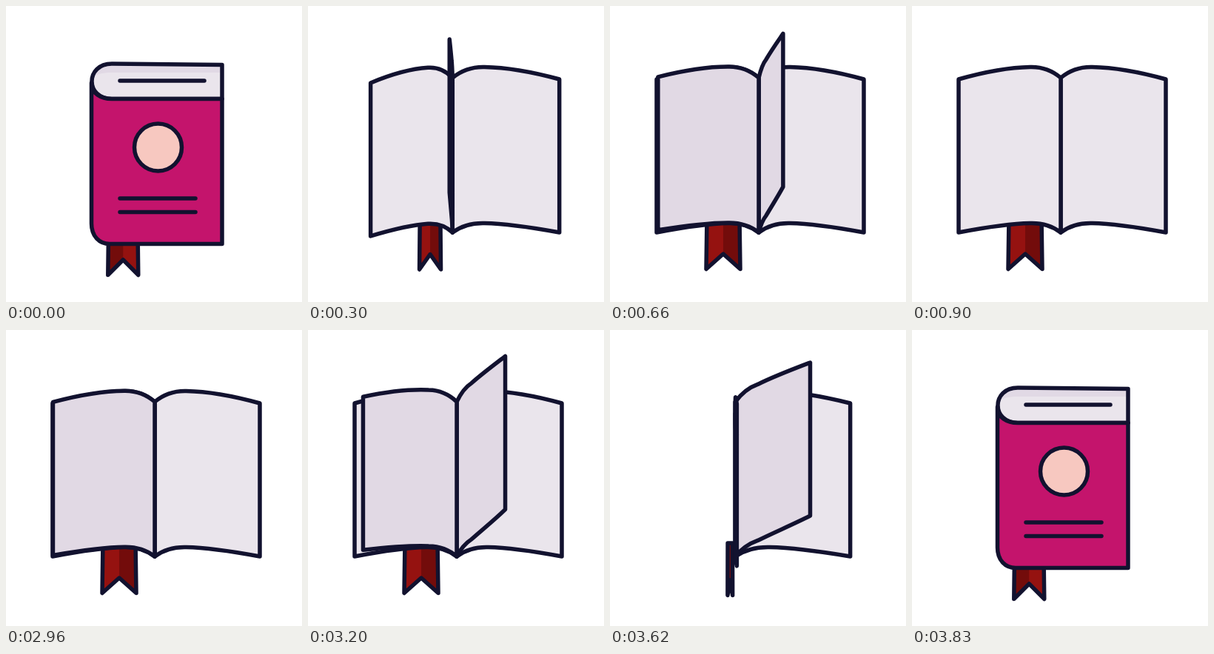
Recreate the animation shown at these times as an HTML page with a canvas. Size 400 px wide and 400 px high, loop 4.86 s.

```html
<!DOCTYPE html>
<html lang="en">
<head>
<meta charset="utf-8">
<title>Opening book</title>
<style>
  html, body { margin: 0; width: 100%; height: 100%; overflow: hidden; background: #fff; }
  canvas { display: block; width: 100vmin; height: 100vmin; }
</style>
</head>
<body>
<canvas id="stage" width="400" height="400"></canvas>
<script>
const ctx = document.getElementById('stage').getContext('2d');
const LOOP = 4860, STEP = 30, OPENED = 900, CLOSING = 2960;
const INK = '#12122f', PAPER = '#eae5ec', TURNING = '#e1d9e4';
const RAD = Math.PI / 180;

// Page edge: distance from the spine, height of top and bottom edges there.
const EDGE = [
  [0, 97, 306], [.085, 87, 297], [.18, 82, 293], [.3, 82.5, 293.5],
  [.52, 83, 294], [.77, 90, 300], [1, 99, 306]
];
const TURN_RATE = .47;
const PAGES = [
  { start: 105, maxLift: 55 },
  { start: 297, maxLift: 64 },
  { start: 497, maxLift: 64 }
];

const block = new Path2D('M292 79.5L143 78C107 78 107 125.5 143 125.5H292Z');
const shade = new Path2D('M292 79.5L143 78C128 78 118 88 117 98C121 92 130 90 143 90H292Z');
const cover = new Path2D('M115.5 104V294C115.5 311 126 321.5 140 321.5H292V125.5H143C128 125.5 115.5 118 115.5 104Z');
const disc = new Path2D('M173.5 191a32 32 0 1 0 64 0a32 32 0 1 0 -64 0Z');
const rules = new Path2D('M154 101H268M154 260H256M154 278.5H256');
const ribbon = new Path2D('M26 285L25 355.5L48 335L71 355.5L70 285Z');
const ribbonLight = new Path2D('M48 285V335L71 355.5L70 285Z');

function paint(path, fill, line = true) {
  if (fill) { ctx.fillStyle = fill; ctx.fill(path); }
  if (line) ctx.stroke(path);
}

// Transforms the geometry while line weights stay constant.
function placed(path, matrix) {
  const result = new Path2D();
  result.addPath(path, matrix);
  return result;
}

function drawPage(spine, open, angle, lift, fill) {
  const turn = Math.cos(angle * RAD);
  const width = turn * ((turn > 0 ? 142 : 138) + 36 * (1 - open));
  const at = (i, side) => [spine + EDGE[i][0] * width, EDGE[i][side] - lift * EDGE[i][0] ** 1.5];
  const path = new Path2D();
  path.moveTo(...at(0, 1));
  path.bezierCurveTo(...at(1, 1), ...at(2, 1), ...at(3, 1));
  path.bezierCurveTo(...at(4, 1), ...at(5, 1), ...at(6, 1));
  path.lineTo(...at(6, 2));
  path.bezierCurveTo(...at(5, 2), ...at(4, 2), ...at(3, 2));
  path.bezierCurveTo(...at(2, 2), ...at(1, 2), ...at(0, 2));
  path.closePath();
  paint(path, fill);
}

function drawCover(spine, open, angle) {
  const sx = Math.cos(angle * RAD), sy = 1 - .15 * open;
  const skew = .05 * Math.sin(angle * RAD);
  const m = new DOMMatrix([sx, skew, 0, sy, spine - 115.5 * sx, 200 * (1 - sy) - 115.5 * skew]);
  const part = path => placed(path, m);
  paint(part(block), PAPER, false);
  paint(part(shade), '#e1d9e5', false);
  paint(part(block));
  paint(part(cover), '#c4146c');
  paint(part(disc), '#f7c8c0');
  paint(part(rules));
}

function drawRibbon(spine, open, p) {
  const sx = Math.cos(Math.min(180, 27 + .34 * p) * RAD);
  const m = new DOMMatrix([sx, 0, 0, 1, spine, 8 * (1 - open)]);
  paint(placed(ribbon, m), '#730c0b', false);
  paint(placed(ribbonLight, m), '#951210', false);
  paint(placed(ribbon, m));
}

function draw(p) {
  const q = Math.min(1, p / 360);
  const open = (1 - Math.cos(Math.PI * q)) / 2;
  const spine = 115.5 + 85.5 * open;
  const coverAngle = 180 * q ** 1.3;

  ctx.clearRect(0, 0, 400, 400);
  ctx.lineWidth = 5.5;
  ctx.lineCap = ctx.lineJoin = 'round';
  ctx.strokeStyle = INK;

  drawRibbon(spine, open, p);
  if (p > 0) drawPage(spine, open, 0, 0, PAPER);

  const turning = PAGES
    .map(({ start, maxLift }) => ({ angle: (p - start) * TURN_RATE, maxLift }))
    .filter(({ angle }) => angle > 18 && angle < 180);
  const drawTurning = ({ angle, maxLift }) => {
    const lift = 55 * Math.sin(angle * RAD) + 18 * Math.sin(2 * angle * RAD);
    drawPage(spine, open, angle, Math.min(lift, maxLift), TURNING);
  };

  turning.filter(page => page.angle < 90).reverse().forEach(drawTurning);
  if (coverAngle < 90) drawCover(spine, open, coverAngle);
  else drawPage(spine, open, coverAngle, -8 * Math.sin(coverAngle * RAD), PAPER);
  turning.filter(page => page.angle >= 90).forEach(drawTurning);
}

// The book closes by running the opening backwards.
function progress(t) {
  const stepped = ms => Math.floor(ms / STEP) * STEP;
  return t < CLOSING
    ? Math.min(OPENED, stepped(t))
    : Math.max(0, OPENED - STEP - stepped(t - CLOSING));
}

const begin = performance.now();
function tick() {
  draw(progress((performance.now() - begin) % LOOP));
  requestAnimationFrame(tick);
}
tick();
</script>
</body>
</html>
```
